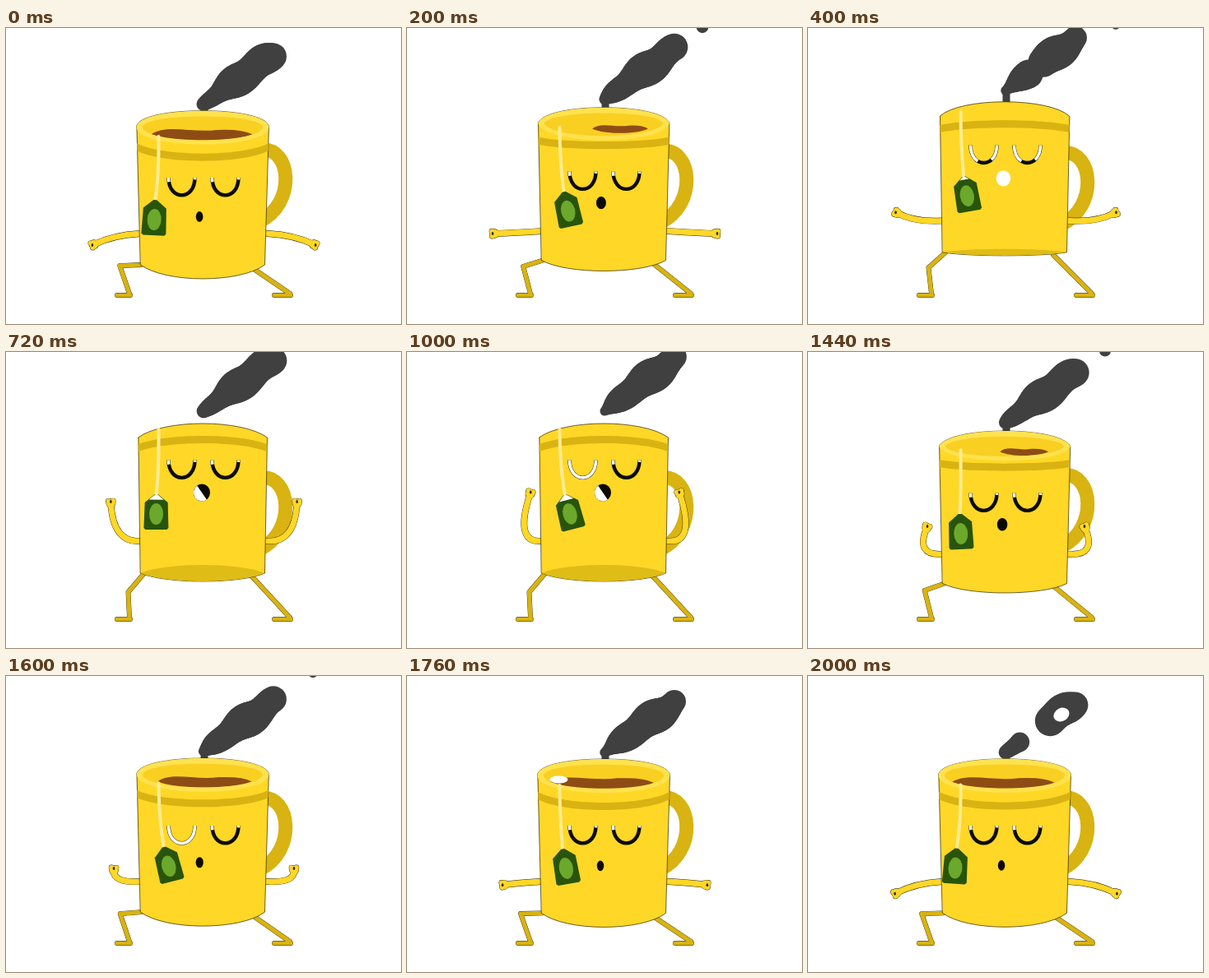
These frames come from a looping animation (480 px wide and 360 px high, 2.04 s). An HTML page with a canvas:

```html
<!DOCTYPE html>
<html lang="en">
<head>
<meta charset="utf-8">
<title>Breathing mug</title>
<style>
html, body { margin: 0; width: 100%; height: 100%; overflow: hidden; background: #fff; }
canvas { display: block; }
</style>
</head>
<body>
<canvas id="stage" width="480" height="360"></canvas>
<script>
const ctx = document.getElementById('stage').getContext('2d');
const LOOP = 2040, STEP = 40, CX = 239;
const YELLOW = '#ffd726', DARK = '#d8b312', LIGHT = '#ffe24e';
const SMOKE = '#404040', LINE = '#2a2508', INK = '#0c0a04';

const clamp = (x, lo = 0, hi = 1) => Math.min(hi, Math.max(lo, x));
const lerp = (a, b, s) => a + (b - a) * s;
const smooth = x => x * x * (3 - 2 * x);
const wave = (t, peak, turns = 1) => Math.cos(2 * Math.PI * turns * (t - peak) / LOOP);
const swell = (t, peak) => (1 + wave(t, peak)) / 2;

function fill(color, draw) {
  ctx.beginPath();
  draw();
  ctx.fillStyle = color;
  ctx.fill();
}

function line(color, width, draw) {
  ctx.beginPath();
  draw();
  ctx.strokeStyle = color;
  ctx.lineWidth = width;
  ctx.stroke();
}

function oval(color, x, y, rx, ry = rx, turn = 0, from = 0, to = 2 * Math.PI) {
  fill(color, () => ctx.ellipse(x, y, rx, ry, turn, from, to));
}

function poly(...p) {
  for (let i = 0; i < p.length; i += 2) ctx.lineTo(p[i], p[i + 1]);
}

function clipped(shape, draw) {
  ctx.save();
  ctx.beginPath();
  shape();
  ctx.clip();
  draw();
  ctx.restore();
}

// Arc across the mug: h > 0 bulges down, w < 0 runs right to left,
// flat 0 is elliptical and .5 a shallow bow
function bow(y, w, h, flat) {
  const x = w * (1 - flat), bulge = y + h * 4 / 3;
  ctx.lineTo(CX - w, y);
  ctx.bezierCurveTo(CX - x, bulge, CX + x, bulge, CX + w, y);
}

// down: 1 is the squat, 0 the full stretch
function poseAt(t) {
  const down = smooth(clamp(1.15 * swell(t, 1850) - .15));
  const tilt = clamp(1.27 * down - .03);
  const topY = lerp(104, 121, down), topR = lerp(17, 20, down);
  return {
    t, down, tilt, topY, topR,
    rim: topY - topR,
    topW: lerp(78.5, 80.5, down),
    topFlat: .4 * (1 - down),
    lip: clamp(76 * down - 32, -topR, 21),
    baseY: lerp(269, 288.5, down),
    baseR: lerp(-10, 17, tilt),
    swing: wave(t, 283, 3),
    open: down > .1 && down < .4
  };
}

function drawSteam({ t, down, rim }) {
  const gap = wave(t - 1240, 0, LOOP / 1520) ** 16;
  const startY = rim - lerp(15, 8, down), endY = rim - lerp(80, 70, down);
  if (down > .05) line(SMOKE, 9, () => poly(241, rim + 3, 241, startY));
  for (let k = 0; k <= 1; k += .025) {
    if (Math.abs(k - .42) < .2 * gap) continue;
    const roll = 14 * k - 6 * Math.PI * t / LOOP;
    oval(SMOKE, 240 + 87 * k, lerp(startY, endY, k) + 3 * k * Math.sin(roll),
      7 + 13 * Math.sin(2.5 * k) + 1.5 * Math.cos(roll));
  }
  // Loose puffs drifting away past the top edge
  for (const born of [27, 1240]) {
    const age = t - born;
    if (age > -20 && age < 440) oval(SMOKE, 346 + age * .075, 1 - age * .012, 9 - age * .01);
  }
  if (gap > .9 && down > .5) oval('#fff', 308, 47, 10, 8, -.5);
}

function drawHandle({ down }) {
  const y = 5 * (1 - down);
  line(DARK, 17, () => {
    ctx.moveTo(310, 148 + y);
    ctx.bezierCurveTo(347, 144 + y, 353, 214 + y, 308, 235 + y);
  });
}

function drawLegs({ down, baseY }) {
  const legs = () => {
    ctx.moveTo(lerp(168, 164, down), baseY);
    poly(lerp(148.5, 138, down), lerp(292, 289, down), 150, 323);
    ctx.moveTo(298, baseY + 3);
    ctx.lineTo(345, 323);
    for (const x of [135, 326]) {
      ctx.moveTo(x, 325);
      ctx.lineTo(x + lerp(16, 20, x > CX), 325);
    }
  };
  line(LINE, 5.8, legs);
  line(DARK, 5.2, legs);
}

function drawArm({ t, tilt }) {
  // The hand circles out, up, in and down
  const x = 106 + 49 * swell(t, 1180) ** 1.5, y = 218 + 46 * wave(t, 1980);
  const shoulder = lerp(230, 250, tilt), elbowX = 130, elbowY = shoulder + 2;
  const a = Math.atan2(y - elbowY, x - elbowX);
  for (const [color, grow] of [[LINE, .4], [YELLOW, 0]]) {
    line(color, 7 + 2 * grow, () => {
      poly(172, shoulder, 163, shoulder);
      ctx.quadraticCurveTo(elbowX, elbowY, x, y);
    });
    oval(color, x, y, 5.5 + grow);
    for (const turn of [-.8, .8])
      oval(color, x + 4 * Math.cos(a + turn), y + 4 * Math.sin(a + turn), 3 + grow);
  }
  oval(LINE, x + 2 * Math.cos(a), y + 2 * Math.sin(a), 1.3, 2);
}

function drawMug(p) {
  const { down, topY, topW, baseY, baseR } = p;
  const body = () => {
    bow(topY, topW, -p.topR, p.topFlat);
    bow(baseY, -75.5, Math.abs(baseR), .4);
    ctx.closePath();
  };
  fill(YELLOW, body);
  line(LINE, .7, body);
  clipped(body, () => {
    if (baseR < 0) fill('#dfbc16', () => {
      bow(baseY, 75.5, baseR, .4);
      bow(baseY, -75.5, -baseR, .4);
    });
    const y = lerp(113, 141, down), r = lerp(-11, 13, down);
    fill(DARK, () => {
      bow(y, 80, r, .4);
      bow(y + 9, -80, r, .4);
    });
  });
  drawOpening(p);
}

function drawOpening({ down, topY, topR, topW, topFlat, lip }) {
  const ring = inset => () => {
    bow(topY, topW - inset, inset * .9 - topR, topFlat);
    bow(topY, inset - topW, lip - inset * .7, topFlat);
  };
  if (lip < 2 - topR) return;
  fill(LIGHT, ring(0));
  if (lip < 12 - topR) return;
  fill('#f9cf22', ring(7.5));

  // Tea comes into view as the mug tips forward
  const seen = clamp((down - .35) / .65);
  const x = lerp(285, 236, seen), y = topY + lerp(4, 9, seen);
  const w = 64 * seen, h = lerp(2, 7, seen);
  clipped(ring(7.5), () => {
    fill('#8e4c15', () => {
      ctx.moveTo(x - w, y);
      ctx.bezierCurveTo(x - w * .7, y - h * 1.9, x - w * .2, y - h * .2, x + w * .3, y - h * .8);
      ctx.quadraticCurveTo(x + w * .8, y - h, x + w, y);
      ctx.bezierCurveTo(x + w * .6, y + h * 1.5, x - w * .6, y + h * 1.5, x - w, y);
    });
    if (down > .995) oval('#fff', 184.5, 126, 11, 4.5);
  });
}

function drawBag({ down, topY, swing }) {
  const x = 188.5 + 9.5 * swing, y = lerp(195, 232, down);
  const a = (183 - x) * Math.PI / 180;
  const hookY = topY + lerp(-10, 12, down);
  const tipX = x + 22 * Math.sin(a), tipY = y - 22 * Math.cos(a);
  line('#ffec92', 4, () => {
    ctx.moveTo(185.5, hookY);
    ctx.quadraticCurveTo(186, lerp(hookY, tipY, .6), tipX, tipY);
  });
  ctx.save();
  ctx.translate(x, y);
  ctx.rotate(a);
  fill('#28540b', () => poly(-2, -22, 2, -22, 14, -12, 15, 19, 13, 21, -13, 21, -15, 19, -14, -12));
  oval('#6ca82c', 0, 2, 8.5, 13);
  const glint = 9 * (1 - down) ** 2;
  fill('#fff', () => poly(0, -23, glint, -23 + glint * .85, -glint, -23 + glint * .85));
  ctx.restore();
}

function drawFace({ down, tilt, swing, open }) {
  const eyeY = lerp(131.5, 182, tilt), tip = open ? 22 : 5;
  ctx.lineCap = 'butt';
  for (const x of [213.5, 266.5]) {
    const lid = () => {
      ctx.moveTo(x - 16, eyeY);
      ctx.bezierCurveTo(x - 16, eyeY + 28.5, x + 16, eyeY + 28.5, x + 16, eyeY);
    };
    const lit = x < CX && swing > .8;
    line(INK, 4.4, lid);
    ctx.setLineDash(lit ? [] : [tip, 62 - 2 * tip, tip, 99]);
    line('#fff', 3.6, lid);
    ctx.setLineDash([]);
  }
  ctx.lineCap = 'round';
  const mouth = [lerp(238, 235, down), lerp(171, 231, down), lerp(10, 4.2, down), lerp(10.5, 6.3, down)];
  oval(open ? '#fff' : INK, ...mouth);
  if (down <= .1) oval('#fff', ...mouth, 0, .3 * Math.PI, 1.3 * Math.PI);
}

function draw(t) {
  const p = poseAt(t);
  ctx.fillStyle = '#fff';
  ctx.fillRect(0, 0, 480, 360);
  ctx.lineCap = ctx.lineJoin = 'round';
  drawSteam(p);
  drawHandle(p);
  drawLegs(p);
  drawArm(p);
  ctx.save();
  ctx.translate(481, 0);
  ctx.scale(-1, 1);
  drawArm(p);
  ctx.restore();
  drawMug(p);
  drawBag(p);
  drawFace(p);
}

const start = performance.now();
function tick() {
  const t = (performance.now() - start) % LOOP;
  draw(Math.floor(t / STEP) * STEP);
  requestAnimationFrame(tick);
}
tick();
</script>
</body>
</html>
```
